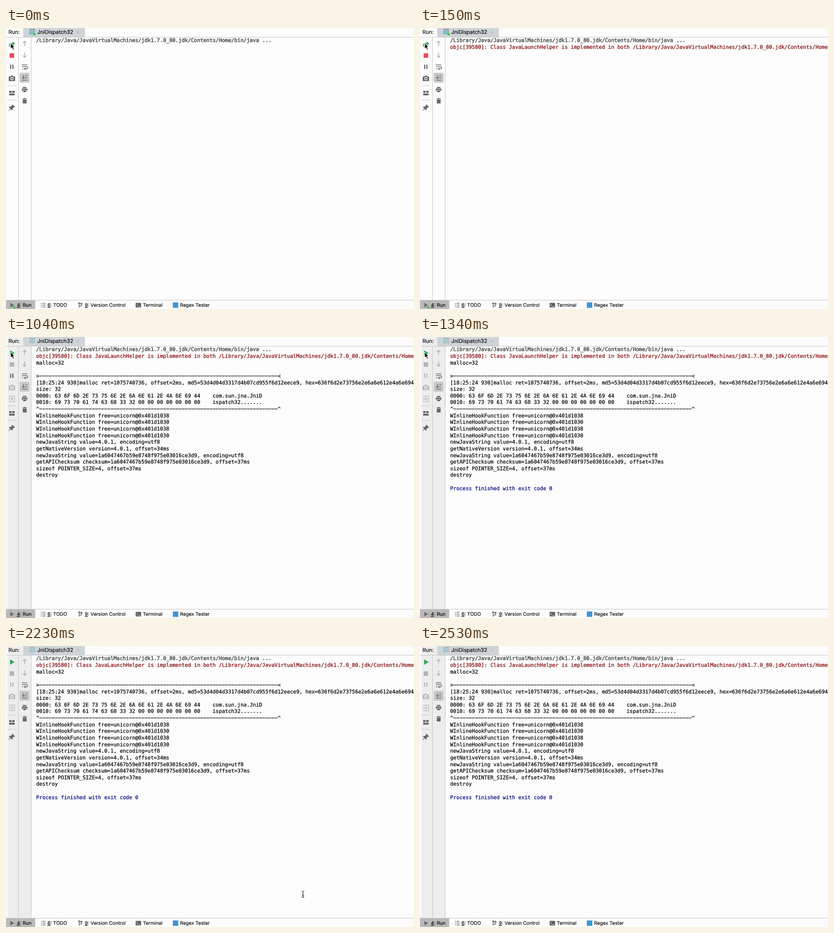
An HTML page for the animation above (3.31 s loop, 900 px wide and 622 px high).

```html
<!DOCTYPE html>
<html lang="en">
<head>
<meta charset="utf-8">
<title>Run console</title>
<style>
html, body { margin: 0; width: 100%; height: 100%; overflow: hidden; background: #fcfcfc; }
svg { display: block; width: 900px; height: 622px; }
text { white-space: pre; text-rendering: geometricPrecision; }
.ui { font-family: Inter, "Open Sans", sans-serif; fill: #000; stroke: #000; stroke-width: .15; }
.console { font: 11.35px "DejaVu Sans Mono", "Liberation Mono", monospace; }
.stroke { fill: none; stroke: #6a6a6a; stroke-width: 1.6; }
.dark { fill: #666; }
.rule { stroke: #c3c3c3; fill: none; }
</style>
</head>
<body>
<svg viewBox="0 0 900 622">
  <rect width="900" height="622" fill="#fcfcfc"/>
  <rect id="toolbar" x="3" y="1" width="52" height="601" fill="#ededed"/>
  <path class="rule" d="M0 20.5H900M27.5 21V602M55.5 21V602M0 602.5H900"/>

  <!-- header -->
  <rect x="38" width="136" height="20" fill="#cfd4d8"/>
  <g class="ui" font-size="11.7">
    <text x="5.5" y="13">Run:</text>
    <text x="69" y="13">JniDispatch32</text>
  </g>
  <g id="tabIcon">
    <path d="M52 2h12v3H52z" fill="#8c999f"/>
    <path d="M51 6h13v8H51z" fill="#9aa7ae"/>
    <path d="M53 7h9v5h-9z" fill="#66c9e2"/>
  </g>
  <path d="M155.5 6.5l6 6m0-6l-6 6" stroke="#a5aaae" fill="none"/>

  <!-- left toolbar -->
  <g id="rerun">
    <path d="M11 41.5A3.5 3.5 0 0 1 11 34.5H15" fill="none" stroke="#36a557" stroke-width="2"/>
    <path d="M14.5 29.5L20 34.5l-5.500 5z" fill="#36a557"/>
  </g>
  <path id="play" d="M9 29.5L19 35.5L9 41.5z" fill="#34a853"/>
  <rect id="stop" x="8" y="56" width="10" height="10"/>
  <path id="pause" d="M9 81h2.5v9.5H9zM14 81h2.5v9.5H14z"/>
  <g id="camera">
    <path d="M6 107.5h3.5l1.5-2h4l1.5 2H20v10H6z"/>
    <circle cx="13" cy="112" r="2.7" fill="none" stroke="#f6f6f6" stroke-width="1.5"/>
  </g>
  <path id="exit" class="stroke" style="stroke:#b9b9b9;stroke-width:1.4"
    d="M8 134V131H19V143H8V140M6 137H15M12 133.5L15.5 137L12 140.5"/>
  <g id="lowerTools">
    <path class="rule" d="M3 127.5H22M3 159.5H22"/>
    <path class="dark" d="M7 139h5v4.500H7zM13.500 139h5.500v4.500H13.500zM7 145h12v4H7z"/>
    <path class="dark" d="M14 169l6 6-1.500 1-1-.5-3 3 .3 2.500-1.500 1.300-3-3-4 3.700-.7-.7 3.700-4-2.800-2.800 1.300-1.500 2.700.2 3-3-.5-1z"/>
  </g>

  <!-- console toolbar -->
  <g class="stroke" style="stroke:#adadad">
    <path d="M41 40V29.5M37 33.5L41 29.5L45 33.5"/>
    <path d="M41 54V65M37 61L41 65L45 61"/>
  </g>
  <rect x="30" y="99" width="22" height="22" rx="2.5" fill="#c9c9c9"/>
  <g class="stroke">
    <path d="M35 81.5H47M35 85.5H45a2.500 2.500 0 0 1 0 5H42M35 90.5H38"/>
    <path d="M35 115.5H47M42.5 105.5H47M42.5 110.5H47M38.5 104V111.5M35.5 109L38.5 112L41.5 109"/>
  </g>
  <path class="dark" d="M43 87.5v6l-3.500-3z"/>
  <path class="dark" d="M37 130.5h8v2.500h-8zM35 134h12v5.500h-2v-2.500h-8v2.500h-2zM38 138h6v4h-6z"/>
  <path class="dark" d="M36.500 156h3l.7-1.200h2l.7 1.200h3v1.500h-9.400zM37 158.500h8.500v8.500H37z"/>

  <g id="console" class="console"></g>

  <!-- bottom bar -->
  <rect y="603" width="64.5" height="19" fill="#b9b9b9"/>
  <path d="M9.5 608.5L18 613.5L9.5 618.5z" fill="#6b6b6b"/>
  <g id="runningDots" fill="#3fc13f">
    <circle cx="63" cy="14" r="2.6"/>
    <circle cx="18" cy="618" r="2.6"/>
  </g>
  <path class="stroke" d="M77 609.5h2m1.500 0H87M77 613.5h2m1.500 0H87M77 617.5h2m1.500 0H87"/>
  <path class="stroke" d="M161.5 608V619M161.5 615.5H166.5V609.5M159 610.5L161.5 608L164 610.5M164 611.5L166.5 609L169 611.5"/>
  <rect x="286" y="608.5" width="12" height="10" fill="#606060"/>
  <path d="M288 611l2.500 2.500-2.500 2.500M292 616.500h4" fill="none" stroke="#f4f4f4"/>
  <rect x="368" y="607.5" width="12" height="12" fill="#3d94d6"/>
  <g class="ui" font-size="10.6">
    <text x="24" y="617"><tspan text-decoration="underline">4</tspan>: Run</text>
    <text x="91.5" y="617"><tspan text-decoration="underline">6</tspan>: TODO</text>
    <text x="174" y="617"><tspan text-decoration="underline">9</tspan>: Version Control</text>
    <text x="302" y="617">Terminal</text>
    <text x="384" y="617">Regex Tester</text>
  </g>

  <path id="arrow" d="M10.5 33.5V46L13.3 43.5L15.5 48.5L17.7 47.5L15.5 42.7H19z" fill="#000" stroke="#fff"/>
  <path id="beam" d="M605.5 504.5q2.500 0 2.500 2v10q0 2-2.500 2M611 504.5q-3 0-3 2M608 516.5q0 2 3 2M606 513.5h4.500" fill="none" stroke="#222" stroke-width="1.2"/>
</svg>
<script>
const LOOP = 3310;
const LAUNCHED = 150, OUTPUT = 900, STOPPED = 1040, FINISHED = 1340, POINTER_LEFT = 2080;
const BEAM_STEPS = [[2080, 0, 0], [2230, 47, 38], [2380, 90, 47]];
const BEAM_GONE = 2530;

const $ = id => document.getElementById(id);
const java = "/Library/Java/JavaVirtualMachines/jdk1.7.0_80.jdk/Contents/Home/bin/java";
const dashes = "\u2212".repeat(77);
const hook = address => "WInlineHookFunction free=unicorn@0x" + address;
const checksum = "1a6047467b59e8748f975e03016ce3d9";

const output = [
  "malloc=32",
  "",
  `>${dashes}<`,
  "[18:25:24 930]malloc ret=1075740736, offset=2ms, md5=53d4d04d3317d4b07cd955f6d12eece9, hex=636f6d2e73756e2e6a6e612e4a6e6944",
  "size: 32",
  "0000: 63 6F 6D 2E 73 75 6E 2E 6A 6E 61 2E 4A 6E 69 44    com.sun.jna.JniD",
  "0010: 69 73 70 61 74 63 68 33 32 00 00 00 00 00 00 00    ispatch32.......",
  `^${dashes}^`,
  hook("401d1038"),
  hook("401d1030"),
  hook("401d1038"),
  hook("401d1030"),
  "newJavaString value=4.0.1, encoding=utf8",
  "getNativeVersion version=4.0.1, offset=34ms",
  `newJavaString value=${checksum}, encoding=utf8`,
  `getAPIChecksum checksum=${checksum}, offset=37ms`,
  "sizeof POINTER_SIZE=4, offset=37ms",
  "destroy"
];

// The outline gives the glyphs the heavier look of smoothed screen text.
function addLine(row, content, color, outline = 0.25) {
  const line = document.createElementNS("http://www.w3.org/2000/svg", "text");
  const attributes = { x: 66.5, y: 31.3 + row * 14.64, fill: color, stroke: color, "stroke-width": outline };
  for (const name in attributes) line.setAttribute(name, attributes[name]);
  line.textContent = content;
  $("console").append(line);
  return line;
}

addLine(0, java + " ...", "#555a55", 0.65);
const warning = addLine(1, `objc[39580]: Class JavaLaunchHelper is implemented in both ${java}`, "#7f0000");
const outputLines = output.map((content, i) => addLine(i + 2, content, "#000"));
const exitLine = addLine(21, "Process finished with exit code 0", "#00007f");

const show = (node, visible) => node.setAttribute("visibility", visible ? "visible" : "hidden");
const fill = (id, color) => $(id).setAttribute("fill", color);

function render(t) {
  const stopped = t >= STOPPED;
  show(warning, t >= LAUNCHED);
  outputLines.forEach(line => show(line, t >= OUTPUT));
  show(exitLine, t >= FINISHED);

  for (const id of ["toolbar", "play", "exit"]) show($(id), stopped);
  for (const id of ["rerun", "runningDots"]) show($(id), !stopped);
  fill("stop", stopped ? "#b5b5b5" : "#f04a5b");
  fill("camera", stopped ? "#b9b9b9" : "#666");
  fill("pause", t >= FINISHED ? "#b9b9b9" : "#666");
  $("tabIcon").setAttribute("opacity", stopped ? 0.5 : 1);
  $("lowerTools").setAttribute("transform", `translate(0 ${stopped ? 25 : 0})`);

  show($("arrow"), t < POINTER_LEFT);
  const step = BEAM_STEPS.filter(([start]) => t >= start).pop();
  show($("beam"), step && t < BEAM_GONE);
  if (step) $("beam").setAttribute("transform", `translate(${step[1]} ${step[2]})`);
}

const start = performance.now();
function tick() {
  render((performance.now() - start) % LOOP);
  requestAnimationFrame(tick);
}
tick();
</script>
</body>
</html>
```
